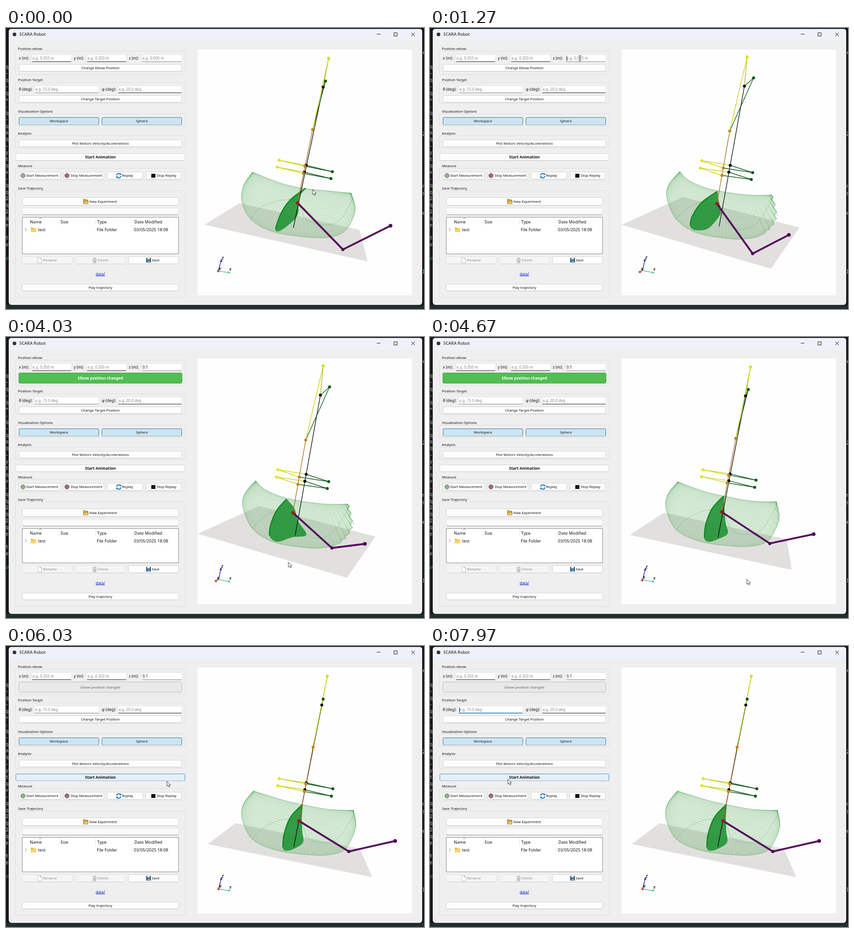
An HTML page for the animation above (8 s loop, 912x614 px).

```html
<!DOCTYPE html>
<html lang="en">
<head>
<meta charset="utf-8">
<title>SCARA Robot</title>
<style>
  html, body { margin: 0; width: 100%; height: 100%; overflow: hidden; background: #16191b; }
  svg { display: block; width: 912px; height: 614px; }
  text { font: 7.75px "Noto Sans", "Open Sans", sans-serif; fill: #111; white-space: pre; }
  .mid { text-anchor: middle; }
  .bold { font-weight: 700; font-size: 8.4px; }
  .label { font-size: 8.5px; }
  .hint { font-size: 8.2px; fill: #858585; }
  .tree { font-size: 9.2px; }
  .axis { font: italic 700 8px "Noto Sans", sans-serif; }
  .code { font: 11px "Noto Sans Mono", monospace; fill: #b9bcbe; }
</style>
</head>
<body>
<svg id="stage" viewBox="0 0 912 614"></svg>
<script>
const LOOP = 8000;
const stage = document.getElementById('stage');

function el(tag, attrs = {}, parent = stage) {
  const node = document.createElementNS('http://www.w3.org/2000/svg', tag);
  set(node, attrs);
  parent.appendChild(node);
  return node;
}
function set(node, attrs) {
  for (const k in attrs) node.setAttribute(k, attrs[k]);
}
function rect(x, y, x2, y2, fill, stroke = 'none', parent = stage, rx = 0) {
  return el('rect', { x, y, width: x2 - x, height: y2 - y, fill, stroke, rx }, parent);
}
function text(x, y, str, cls = '', parent = stage) {
  const node = el('text', { x, y, class: cls }, parent);
  node.textContent = str;
  return node;
}
function path(d, attrs = {}, parent = stage) {
  return el('path', { d, fill: 'none', stroke: '#222', ...attrs }, parent);
}
function button(x, y, x2, y2, str, parent, cls = 'mid', tx = (x + x2) / 2) {
  const box = rect(x + .5, y + .5, x2 - .5, y2 - .5, '#fdfdfd', '#d3d3d3', parent, 2);
  path(`M${x + 2} ${y2 - .5}H${x2 - 2}`, { stroke: '#bdbdbd', 'stroke-width': .7 }, parent);
  const label = text(tx, (y + y2) / 2 + 2.8, str, cls, parent);
  return { box, label };
}
function frame(y, y2, title, parent) {
  const box = rect(20.5, y + 5.5, 391.5, y2 - .5, '#efefef', '#dedede', parent, 2);
  text(26, y + 2.8, title, '', parent);
  return box;
}
function field(x, y, x2, hint, parent) {
  rect(x, y, x2, y + 16, '#fff', '#e2e2e2', parent, 1.5);
  const line = path(`M${x + 1} ${y + 15.5}H${x2 - 1}`, {}, parent);
  const label = text(x + 2, y + 11, hint, 'hint', parent);
  const caret = path(`M${x + 2.5} ${y + 3}v11`, { stroke: '#000' }, parent);
  return { line, label, caret, x };
}

// Desktop strip and window
rect(0, 0, 912, 614, '#16191b');
rect(0, 605, 912, 614, '#242d2e');
const glyphs = 'q-q-q=.q-qaq-ytqv-qq2q2qe te u';
[...glyphs].forEach((c, i) => {
  const y = 88 + i * 14.4;
  const node = text(-1, y, c, 'code');
  if (i === 25) node.style.fill = '#d0a030';
  if (i === 29) node.style.fill = '#3cb043';
});
[[57, 'x'], [235, '2'], [349, 'n'], [365, 's'], [408, 'e'], [536, 'l']].forEach(([y, c]) => text(908, y, c, 'code'));
rect(6, 2, 908, 605, '#efefef', 'none', stage, 6);
path('M6 28V8q0-6 6-6H902q6 0 6 6V28Z', { fill: '#eef2f8', stroke: 'none' });
el('circle', { cx: 18.5, cy: 14, r: 4, fill: '#333' });
text(29, 17.3, 'SCARA Robot').style.fontSize = '9.4px';
path('M809 13.5h8M846.5 10.5h7v7h-7ZM884.5 10l7.5 8m0-8l-7.5 8', { stroke: '#111' });

// Control panel
const elbowBox = frame(45, 102, 'Position elbow');
[[28, 'x (m):'], [148, 'y (m):'], [268, 'z (m):']].forEach(([x, s]) => text(x, 69, s, 'label'));
field(56, 58, 143, 'e.g. 0.350 m').caret.remove();
field(176, 58, 263, 'e.g. 0.350 m').caret.remove();
const zField = field(296, 58, 384, 'e.g. 0.000 m');
const plainElbow = el('g');
button(28, 79, 384, 95, 'Change Elbow Position', plainElbow);
const stateElbow = el('g');
const stateBox = rect(28, 78.5, 384, 101, '#e03033', '#b8272a', stateElbow, 2.5);
const stateText = text(206, 92.8, '', 'mid', stateElbow);

const saveBox = frame(350, 589, '');
const lower = el('g');
frame(113.5, 165, 'Position Target', lower);
text(28, 137, 'θ (deg):', 'label', lower);
text(209, 137, 'φ (deg):', 'label', lower);
const tField = field(62, 126, 203, 'e.g. 15.0 deg', lower);
field(244, 126, 384, 'e.g. 20.0 deg', lower).caret.remove();
button(28, 147, 384, 163, 'Change Target Position', lower);
frame(182, 215, 'Visualization Options', lower);
for (const [x, x2, s] of [[28, 203, 'Workspace'], [209, 384, 'Sphere']])
  set(button(x, 195, x2, 212, s, lower).box, { fill: '#cde5f2', stroke: '#3c7295' });
frame(230, 263, 'Analysis', lower);
button(28, 244, 384, 260, 'Plot Motors Velocity/Accelerations', lower);
const startBtn = button(21, 274, 391, 290, 'Start Animation', lower, 'mid bold');
frame(301, 334, 'Measure', lower);
button(28, 314, 119, 331, 'Start Measurement', lower, '', 44);
button(125, 314, 214, 331, 'Stop Measurement', lower, '', 141);
button(220, 314, 299, 331, 'Replay', lower, '', 253);
button(305, 314, 383, 331, 'Stop Replay', lower, '', 329);
for (const [cx, fill] of [[37, '#8bb584'], [133, '#a5667a']])
  el('circle', { cx, cy: 322.5, r: 5, fill, stroke: '#777', 'stroke-width': .9 }, lower);
path('M241.5 322a4.5 4.5 0 0 1 8-2.5m1 4a4.5 4.5 0 0 1-8 2.5', { stroke: '#2779b8', 'stroke-width': 2.2 }, lower);
path('M247 321h4.5v-4.5ZM245 324h-4.5v4.5Z', { fill: '#2779b8', stroke: 'none' }, lower);
rect(317, 318.5, 326, 327, '#161016', 'none', lower);
text(26, 352.8, 'Save Trajectory', '', lower);
button(35, 370, 377, 388, 'New Experiment', lower, '', 182);
path('M169 374h4l1 1.500h5v8.500h-10Z', { fill: '#d9a63a', stroke: '#7d5a1d', 'stroke-width': .7 }, lower);
path('M171 379h9l-2 5h-9Z', { fill: '#f2cf68', stroke: '#7d5a1d', 'stroke-width': .5 }, lower);
rect(35.5, 393, 376.500, 408, '#fafafa', '#e2e2e2', lower, 1);
path('M36 408H376', { stroke: '#999' }, lower);

const treeBox = rect(35.5, 413.5, 376.5, 493.5, '#fff', '#868a90');
const tree = el('g');
path('M116.500 415v16M195.500 415v16M277.500 415v16', { stroke: '#e4e4e4' }, tree);
path('M72 417l3-3 3 3', { stroke: '#777', 'stroke-width': .8 }, tree);
path('M41.5 437.500l3 3-3 3', { stroke: '#777' }, tree);
[[52, 427, 'Name'], [119, 427, 'Size'], [199, 427, 'Type'], [280, 427, 'Date Modified'],
 [70, 444, 'test'], [198, 444, 'File Folder'], [279, 444, '03/05/2025 18:08']]
  .forEach(([x, y, s]) => text(x, y, s, 'tree', tree));
path('M54 436h4.500l1.500 1.500h6v8h-12Z', { fill: '#e5ae37', stroke: 'none' }, tree);
rect(54, 438.500, 66, 446, '#fbd368', 'none', tree, 1);

for (const [x, x2, s, tx] of [[35, 145, 'Rename', 81], [151, 261, 'Delete', 200]]) {
  const b = button(x, 499, x2, 516, s, stage, '', tx);
  set(b.box, { fill: '#f5f5f5', stroke: '#e4e4e4' });
  b.label.style.fill = '#8a8a8a';
}
button(267, 499, 377, 516, 'Save', stage, '', 318);
path('M69.500 502h5.500l3 3v8.500h-8.500ZM75 502v3h3', { fill: '#fff', stroke: '#aaa', 'stroke-width': .8 });
path('M189 504h8.500M192 502.500h3M190 505l.6 8h5.500l.6-8M192.500 506v6M194.500 506v6', { stroke: '#999' });
rect(306, 502, 316, 512.500, '#28506f', 'none', stage, 1);
rect(308, 502, 314, 506, '#d5e4ee');
rect(308.500, 508, 314, 512.500, '#7fa9c4');
const link = text(206, 540.5, 'data/', 'mid');
link.style.cssText = 'fill:#1414c8;text-decoration:underline;font-size:8.4px';
button(35, 559, 377, 575, 'Play trajectory');

// Camera poses: joints, ground corners, axes and workspace outline
const VIEWS = {
  start: {
    nodes: [704,66, 697,116, 692,129, 669,222, 655,300, 652,302, 651,315, 649,318,
            596,289, 592,304, 712,314, 709,329, 636,382, 735,484, 839,432, 627,436],
    ground: [433,430, 509,383, 771,441, 789,510],
    axes: [463,531, 463,531, 470,506, 489,535, 464,529],
    top: [538,315, 570,328, 610,342, 655,351, 705,356, 753,361],
    bottom: [538,315, 518,345, 515,382, 537,421, 585,446, 655,457, 708,457, 743,440, 762,398, 753,361],
    blade: [654,350, 622,374, 601,403, 588,438, 597,443, 622,425, 636,408, 638,386, 640,368],
    left: [530,425, 552,395, 590,378, 636,374],
    right: [640,385, 655,418, 690,430, 728,420, 757,372],
    rag: [0]
  },
  turned: {
    nodes: [692,63, 706,109, 686,127, 654,225, 655,300, 640,306, 652,315, 637,322,
            593,290, 590,306, 704,316, 701,331, 626,384, 704,493, 783,452, 631,433],
    ground: [418,430, 552,369, 806,436, 744,526],
    axes: [464,530, 458,533, 469,505, 489,535, 460,530],
    top: [545,314, 565,333, 605,350, 655,360, 700,365, 745,365],
    bottom: [545,314, 521,342, 517,372, 537,418, 580,447, 640,459, 688,461, 727,450, 754,415, 745,365],
    blade: [627,357, 592,382, 572,412, 568,432, 578,441, 606,438, 630,412, 634,397, 629,375],
    left: [535,420, 560,395, 595,378, 626,372],
    right: [632,390, 648,425, 680,440, 715,425, 748,372],
    rag: [1]
  },
  end: {
    nodes: [701,66, 692,116, 689,129, 670,221, 655,299, 654,301, 652,314, 651,318,
            596,290, 593,305, 713,312, 710,328, 639,382, 748,449, 849,426, 628,438],
    ground: [440,433, 501,387, 772,443, 799,505],
    axes: [464,531, 464,531, 470,506, 489,535, 465,528],
    top: [540,317, 570,326, 610,338, 650,347, 705,357, 758,359],
    bottom: [540,317, 518,345, 515,378, 537,422, 588,446, 655,456, 708,456, 742,442, 763,396, 758,359],
    blade: [647,346, 621,374, 607,410, 604,440, 613,447, 634,440, 648,428, 646,405, 645,378],
    left: [532,428, 560,398, 600,380, 640,376],
    right: [645,385, 660,420, 690,430, 725,420, 758,370],
    rag: [0]
  }
};
const raised = { ...VIEWS.turned, nodes: [...VIEWS.turned.nodes],
  blade: [612,354, 590,380, 577,412, 575,434, 592,447, 625,437, 655,432, 637,403, 629,375] };
raised.nodes.splice(26, 2, 711, 461);

const clamp = v => Math.max(0, Math.min(1, v));
const ease = (t, a, b) => { const k = clamp((t - a) / (b - a)); return k * k * (3 - 2 * k); };
const lerp = (a, b, k) => a + (b - a) * k;
const pairs = flat => Array.from({ length: flat.length / 2 }, (_, i) => [flat[2 * i], flat[2 * i + 1]]);
const toPath = pts => 'M' + pts.map(p => p[0].toFixed(1) + ' ' + p[1].toFixed(1)).join('L');

function blend(a, b, k) {
  const out = {};
  for (const key in a) out[key] = a[key].map((v, i) => lerp(v, b[key][i], k));
  return out;
}
// Catmull-Rom curve sampled at n + 1 even parameters
function spline(pts, n) {
  const last = pts.length - 1;
  return Array.from({ length: n + 1 }, (_, j) => {
    const u = j / n * last, i = Math.min(last - 1, Math.floor(u)), f = u - i;
    const [p, q, r, s] = [pts[Math.max(0, i - 1)], pts[i], pts[i + 1], pts[Math.min(last, i + 2)]];
    return [0, 1].map(c => q[c] + .5 * f * (r[c] - p[c] + f * (2 * p[c] - 5 * q[c] + 4 * r[c] - s[c]
      + f * (3 * (q[c] - r[c]) + s[c] - p[c]))));
  });
}

// 3D view
rect(418, 47, 886, 584, '#fefefe');
const ground = path('', { fill: '#e2e0de', stroke: 'none' });
const shell = path('', { fill: '#4aa54a', 'fill-opacity': .2, stroke: '#3a9a42', 'stroke-opacity': .6, 'stroke-width': .8, 'stroke-dasharray': '2 1' });
const wire = { stroke: '#2f9238', 'stroke-width': .6, 'stroke-opacity': .5, 'stroke-dasharray': '1 1' };
const levels = path('', wire);
const ribs = path('', { ...wire, 'stroke-opacity': .36 });
const folds = path('', { stroke: '#2f9238', 'stroke-opacity': .45, 'stroke-width': 1, 'stroke-dasharray': '1.5 .8' });
const fleck = path('M758 405v5', { stroke: '#8fc393' });
const dots = el('pattern', { id: 'dots', width: 2.6, height: 2.6, patternUnits: 'userSpaceOnUse' }, el('defs'));
rect(0, 0, 2.6, 2.6, '#24983a', 'none', dots);
rect(.3, .3, 1.7, 1.7, '#108021', 'none', dots);
const blade = path('', { fill: 'url(#dots)', 'fill-opacity': .88, stroke: '#138a26', 'stroke-dasharray': '2 1' });
const bladeEdge = path('', { stroke: '#0b8a20', 'stroke-width': 2.6 });

const BLACK = '#111', GREEN = '#0d5a1c', YELLOW = '#cfd418', BROWN = '#a96f24', PURPLE = '#560b5c';
const bars = [
  [2, 15, BLACK], [1, 2, GREEN], [1, 3, GREEN], [0, 2, '#aeb21c'], [0, 3, YELLOW],
  [8, 4, YELLOW], [8, 5, YELLOW], [9, 6, YELLOW], [9, 7, YELLOW],
  [10, 4, GREEN], [10, 5, GREEN], [11, 6, GREEN], [11, 7, GREEN], [3, 12, BROWN],
  [12, 13, PURPLE, 4], [13, 14, PURPLE, 4]
].map(([a, b, stroke, w = 1.4]) => ({ a, b, node: el('line', { stroke, 'stroke-width': w, 'stroke-linecap': 'round' }) }));
const balls = [[1, '#0b5514'], [2, '#080808'], [4, '#080808'], [6, '#080808'], [10, '#0b5514'], [11, '#0b5514'],
  [0, '#d9dd12'], [8, '#e2e410'], [9, '#e2e410'], [3, '#c58414'], [5, '#c58414'], [7, '#c58414'],
  [12, '#a5121a', 3.6], [13, '#4d0953', 3.5], [14, '#4d0953', 4]
].map(([i, fill, r = 3.2]) => ({ i, node: el('circle', { r, fill }) }));
const axes = ['#e0493f', '#1c1ca8', '#4ec78a'].map(stroke => path('', { stroke, 'stroke-width': 1.4 }));
const tips = ['#1c1ca8', '#4ec78a'].map(fill => path('', { fill, stroke: 'none' }));
const axisBall = el('circle', { r: 2.6, fill: '#d9463e' });
const axisText = ['X', 'Y', 'Z'].map(s => text(0, 0, s, 'axis'));

function drawView(p) {
  const n = pairs(p.nodes);
  set(ground, { d: toPath(pairs(p.ground)) + 'Z' });
  const top = spline(pairs(p.top), 60);
  const bottom = spline(pairs(p.bottom), 60).map(([x, y], i) =>
    [x + (i > 46 && i < 60 ? p.rag[0] * (i % 2 ? 3 : -3) : 0), y]);
  set(shell, { d: toPath([...top, ...bottom.slice().reverse()]) + 'Z' });
  const across = (i, v) => [lerp(top[i][0], bottom[i][0], v), lerp(top[i][1], bottom[i][1], v)];
  let d = '';
  for (let k = 1; k < 34; k++) {
    const v = (1 - Math.cos(Math.PI * k / 34)) / 2;
    d += toPath(top.map((_, i) => across(i, v)));
  }
  set(levels, { d });
  d = '';
  for (let i = 1; i < 60; i++) d += toPath([top[i], bottom[i]]);
  set(ribs, { d });
  set(folds, { d: toPath(spline(pairs(p.left), 20)) + toPath(spline(pairs(p.right), 24)) });
  set(fleck, { opacity: p.rag[0] });
  const edge = pairs(p.blade);
  set(blade, { d: toPath(spline([...edge, edge[0]], 54)) + 'Z' });
  set(bladeEdge, { d: toPath(spline(edge.slice(0, 4), 18)) });
  for (const { a, b, node } of bars) set(node, { x1: n[a][0], y1: n[a][1], x2: n[b][0], y2: n[b][1] });
  for (const { i, node } of balls) set(node, { cx: n[i][0], cy: n[i][1] });

  const [o, x, z, y, label] = pairs(p.axes);
  [x, z, y].forEach((e, i) => set(axes[i], { d: toPath([o, e]) }));
  set(tips[0], { d: `M${z[0]} ${z[1] - 1}l2 6-5-1Z` });
  set(tips[1], { d: `M${y[0] + 1.500} ${y[1]}l-6-3.500 1 5Z` });
  set(axisBall, { cx: x[0], cy: x[1] });
  [label, [y[0] - 2, y[1] - 4], [z[0] + .5, z[1]]].forEach((e, i) => set(axisText[i], { x: e[0], y: e[1] }));
}

// Pointer
const arrow = path('M0 0V11l2.600-2.400 1.800 4 1.900-.8-1.800-3.900H8Z', { fill: '#fff', stroke: '#111', 'stroke-width': .8 });
const beam = path('M-2.500-5.500h2l.5.500.5-.5h2M0-5V5M-2.500 5.500h2l.5-.5.5.5h2', { stroke: '#222' });
const ROUTE = [[0, 669, 353], [430, 588, 308], [950, 327, 66], [1950, 327, 66], [2330, 322, 132],
  [2620, 300, 92], [2900, 300, 92], [3700, 614, 480], [4030, 616, 492], [4900, 707, 537],
  [5250, 707, 537], [6600, 129, 145], [7200, 129, 145], [7800, 170, 291], [LOOP, 170, 291]];

function pointer(t) {
  const i = ROUTE.findIndex(r => r[0] > t), a = ROUTE[i - 1], b = ROUTE[i];
  const k = ease(t, a[0], b[0]);
  return [lerp(a[1], b[1], k), lerp(a[2], b[2], k)];
}
const inside = ([x, y], x1, y1, x2, y2) => x >= x1 && x <= x2 && y >= y1 && y <= y2;

const FOCUS_Z = 1000, TYPED = [1500, 1700, 2000], APPLY = 2720, FADE = 4750, FOCUS_T = 6850;

function paintField(f, focused, since, lineAge, caretX) {
  const lit = focused && lineAge > 350;
  set(f.line, { stroke: lit ? '#1c73b8' : '#8c8c8c', 'stroke-width': lit ? 1.6 : 1 });
  set(f.caret, { visibility: focused && since % 1060 < 530 ? 'visible' : 'hidden', transform: `translate(${caretX} 0)` });
}

function render(t) {
  const typed = TYPED.filter(k => t >= k).length;
  const shift = typed ? 5 : 0;
  set(lower, { transform: `translate(0 ${shift})` });
  set(tree, { transform: `translate(0 ${shift})` });
  set(treeBox, { y: 413.5 + shift, height: 80 - shift });
  set(elbowBox, { height: 51 + shift });
  set(saveBox, { y: 355.5 + shift, height: 233 - shift });

  zField.label.textContent = typed ? '0.1'.slice(0, typed) : 'e.g. 0.000 m';
  zField.label.style.fill = typed ? '#111' : '';
  const lastKey = typed ? TYPED[typed - 1] : FOCUS_Z;
  paintField(zField, t >= FOCUS_Z && t < APPLY, t - lastKey, t - FOCUS_Z, [0, 5, 7, 12][typed]);
  paintField(tField, t >= FOCUS_T, t - FOCUS_T, t - FOCUS_T, 0);

  set(plainElbow, { visibility: typed ? 'hidden' : 'visible' });
  set(stateElbow, { visibility: typed ? 'visible' : 'hidden' });
  const [fill, stroke, ink] = t < APPLY ? ['#e03033', '#b8272a', '#fff']
    : t < FADE ? ['#51bd52', '#3f9a41', '#fff'] : ['#e9e9e9', '#b9b9b9', '#606060'];
  set(stateBox, { fill, stroke });
  stateText.textContent = t < APPLY ? 'Change Elbow position' : 'Elbow position changed';
  stateText.style.fill = ink;
  set(stateText, { class: t < FADE ? 'mid bold' : 'mid' });

  const pos = pointer(t);
  const hover = inside(pos, 21, 274 + shift, 391, 290 + shift + 2);
  set(startBtn.box, { fill: hover ? '#e3f0fa' : '#fdfdfd', stroke: hover ? '#4b8fbd' : '#d3d3d3' });
  const overText = [[56, 143], [176, 263], [296, 384]].some(([a, b]) => inside(pos, a, 58, b, 74))
    || [[62, 203], [244, 384]].some(([a, b]) => inside(pos, a, 126 + shift, b, 142 + shift));
  const at = `translate(${pos[0].toFixed(1)} ${pos[1].toFixed(1)})`;
  set(arrow, { transform: at, visibility: overText ? 'hidden' : 'visible' });
  set(beam, { transform: at, visibility: overText ? 'visible' : 'hidden' });

  drawView(t < APPLY ? blend(VIEWS.start, VIEWS.turned, ease(t, 20, 430))
    : blend(raised, VIEWS.end, ease(t, 4050, 4900)));
}

let origin = null;
function tick(now) {
  if (origin === null) origin = now;
  render((now - origin) % LOOP);
  requestAnimationFrame(tick);
}
render(0);
requestAnimationFrame(tick);
</script>
</body>
</html>
```
